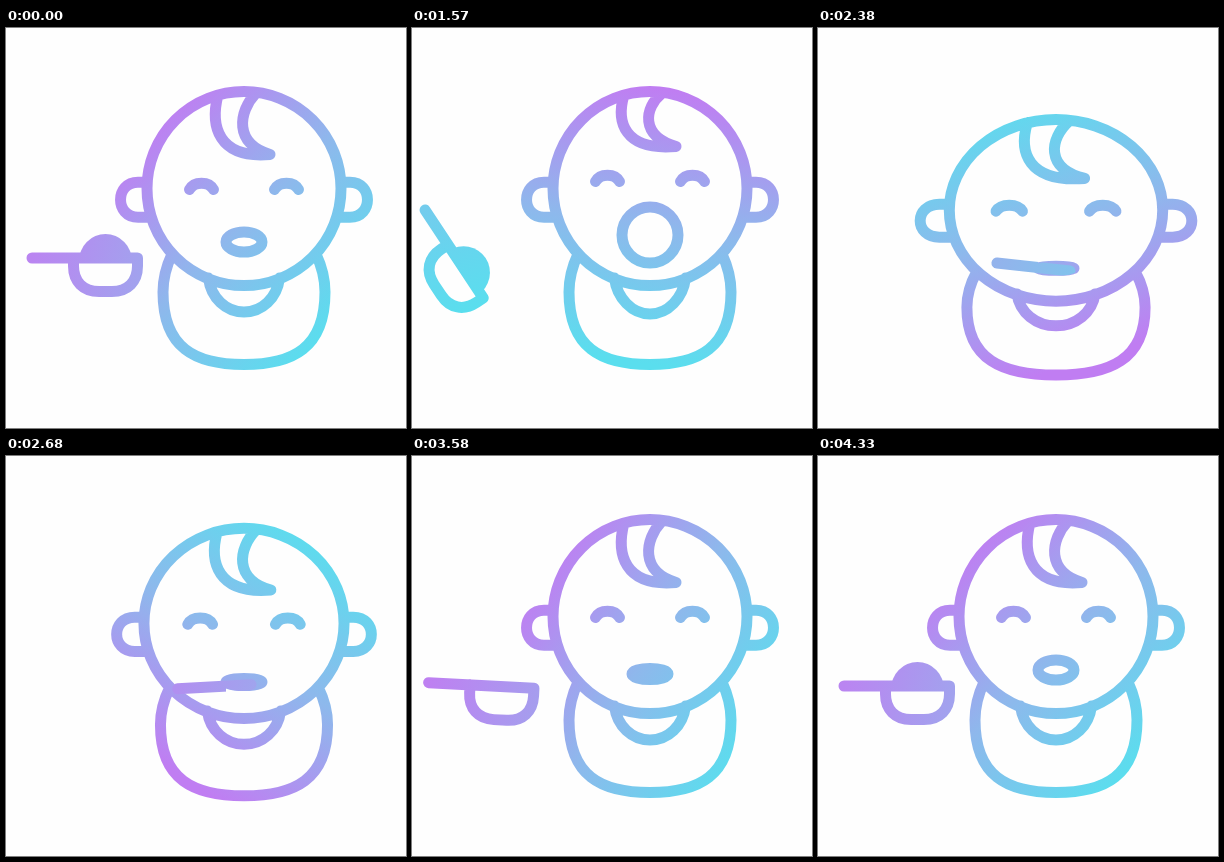
Write an HTML page with a canvas that moves like this. It is 400x400 px and loops after 4.36 s.

```html
<!DOCTYPE html>
<html lang="en">
<head>
<meta charset="utf-8">
<title>Feeding time</title>
<style>
  html, body { margin: 0; width: 100%; height: 100%; overflow: hidden; background: #fefefe; }
  canvas { display: block; width: 400px; height: 400px; }
</style>
</head>
<body>
<canvas id="stage" width="400" height="400"></canvas>
<script>
const ctx = document.getElementById('stage').getContext('2d');
const LOOP = 4360;
const LINE = 11;
const CENTER = 238;
const FLOOR = 336.5;
const PURPLE = [196, 120, 242];
const MIDDLE = [146, 181, 236];
const CYAN = [90, 222, 238];

// Moments of the story, in ms.
const START = 1010, OPEN = 1570, BITE = 2090, SHUT = 2380, LIFT = 3040, AWAY = 3400, REFILL = 3700, END = 4330;

const SPOON_STOPS = [
  { time: START, x: 99.5, y: 230, tilt: 0 },
  { time: OPEN, x: 53.6, y: 243.3, tilt: 56.5 },
  { time: SHUT, x: 252, y: 243, tilt: 6.2 },
  { time: LIFT, x: 236, y: 210, tilt: -15.5 },
  { time: AWAY, x: 90, y: 230.5, tilt: 3 },
  { time: REFILL, x: 90, y: 230.5, tilt: 3 },
  { time: END, x: 99.5, y: 230, tilt: 0 }
];

const clamp = u => Math.min(1, Math.max(0, u));
const smooth = u => u * u * (3 - 2 * u);
const mix = (a, b, u) => a + (b - a) * u;
const ease = (t, from, to) => smooth(clamp((t - from) / (to - from)));
const bump = (t, from, peak, to) => t < peak ? ease(t, from, peak) : 1 - ease(t, peak, to);

function tint(p) {
  const u = clamp(p) * 2;
  const [from, to] = u < 1 ? [PURPLE, MIDDLE] : [MIDDLE, CYAN];
  return `rgb(${from.map((v, i) => Math.round(mix(v, to[i], u < 1 ? u : u - 1))).join()})`;
}

function gradient(x0, y0, x1, y1, from, to) {
  const g = ctx.createLinearGradient(x0, y0, x1, y1);
  for (const u of [0, 0.5, 1]) g.addColorStop(u, tint(mix(from, to, u)));
  return g;
}

function spoonAt(t) {
  const next = SPOON_STOPS.findIndex(stop => stop.time > t);
  if (next < 1) return SPOON_STOPS[0];
  const a = SPOON_STOPS[next - 1], b = SPOON_STOPS[next];
  const u = ease(t, a.time, b.time);
  return { x: mix(a.x, b.x, u), y: mix(a.y, b.y, u), tilt: mix(a.tilt, b.tilt, u) };
}

function poseAt(t) {
  const squash = 0.28 * bump(t, START, 1300, OPEN) - 0.35 * bump(t, 1800, BITE, SHUT)
    + bump(t, BITE, SHUT, 2860);
  const lift = bump(t, 2700, LIFT, 3300);
  const open = ease(t, START, OPEN) - ease(t, BITE, SHUT);
  const shut = ease(t, BITE, SHUT) - ease(t, REFILL, 4200);
  const relax = shut * ease(t, SHUT, LIFT);

  const sx = 1 + 0.1 * squash;
  const sy = 1 - 0.064 * squash;
  const drop = 10.5 * squash - 4 * lift;
  const X = x => CENTER + (x - CENTER) * sx;
  const Y = y => FLOOR + drop + (y - FLOOR) * sy;
  const mouth = {
    rx: 18 + 10 * open,
    ry: 10 + 18 * open - 8 * shut + 3.5 * relax + lift,
    y: Y(214) - 7 * open + 8 * shut - 4 * relax - 2.5 * lift
  };

  const turned = smooth(1 - (1 - clamp((t - START) / (END - START))) ** 1.5);
  const turn = (45 + 360 * turned) * Math.PI / 180;
  return { sx, sy, X, Y, mouth, turn, look: -8 * open };
}

function drawBaby({ sx, sy, X, Y, mouth, turn, look }) {
  const move = (x, y) => ctx.moveTo(X(x), Y(y));
  const line = (x, y) => ctx.lineTo(X(x), Y(y));
  const curve = (a, b, c, d, e, f) => ctx.bezierCurveTo(X(a), Y(b), X(c), Y(d), X(e), Y(f));
  const oval = (x, y, rx, ry) => {
    ctx.moveTo(x + rx, y);
    ctx.ellipse(x, y, rx, ry, 0, 0, 2 * Math.PI);
  };

  const gx = 138 * Math.cos(turn), gy = 138 * Math.sin(turn);
  ctx.strokeStyle = gradient(CENTER - gx, 197 - gy, CENTER + gx, 197 + gy, 0.04, 1.04);
  ctx.beginPath();

  oval(X(CENTER), Y(160.6), 97 * sx, 97 * sy);

  for (const side of [-1, 1]) {
    const x = d => CENTER + side * d;
    // Ear
    move(x(97), 154.2);
    line(x(106), 154.2);
    curve(x(129.3), 154.2, x(129.3), 189.2, x(106), 189.2);
    line(x(94), 189.2);
    // Bib and its neckline
    move(x(72), 226);
    curve(x(79), 241, x(81), 252, x(81), 264);
    curve(x(81), 320, x(49), FLOOR, x(0), FLOOR);
    move(x(35.5), 250);
    curve(x(33), 270, x(18), 284 - look / 4, x(0), 284 - look / 4);
    // Eye
    const eye = x(42.5);
    move(eye - 12, 161.5 + look);
    curve(eye - 7.5, 153 + look, eye + 7.5, 153 + look, eye + 12, 161.5 + look);
  }

  // Curl of hair
  move(212, 67);
  curve(204, 98 + look / 2, 212, 131 + look, 264, 126.5 + look);
  curve(228, 116 + look, 232, 84 + look / 2, 250, 65);

  oval(CENTER, mouth.y, mouth.rx, mouth.ry);
  ctx.stroke();
}

function drawSpoon(t, { mouth, turn }) {
  const { x, y, tilt } = spoonAt(t);
  const angle = tilt * Math.PI / 180;
  const swallowed = ease(t, BITE, 2250);
  const depth = 1 - swallowed + ease(t, LIFT, 3200);
  const food = 1 - swallowed + ease(t, REFILL, 4120);
  const shade = 0.5 - 0.42 * Math.cos(turn + angle);

  ctx.save();
  // Past the lips the spoon shows only inside the mouth.
  ctx.beginPath();
  ctx.rect(0, 0, CENTER - mouth.rx, 400);
  ctx.ellipse(CENTER, mouth.y, mouth.rx + LINE / 2, mouth.ry + LINE / 2, 0, 0, 2 * Math.PI);
  ctx.clip();

  ctx.translate(x, y);
  ctx.rotate(angle);
  ctx.strokeStyle = ctx.fillStyle = gradient(-73.5, 0, 32, 25, shade - 0.1, shade + 0.14);

  const w = 32 * depth, h = 33.5 * depth;
  ctx.beginPath();
  ctx.moveTo(-73.5, 0);
  ctx.lineTo(w, 0);
  ctx.lineTo(w, h * 0.24);
  ctx.bezierCurveTo(w, h * 0.7, w * 0.7, h, w * 0.2, h);
  ctx.lineTo(-w * 0.2, h);
  ctx.bezierCurveTo(-w * 0.7, h, -w, h * 0.7, -w, h * 0.24);
  ctx.lineTo(-w, 0);
  ctx.stroke();

  ctx.beginPath();
  ctx.ellipse(0, 3, 26.5 * food, 27 * food, 0, Math.PI, 2 * Math.PI);
  ctx.fill();
  ctx.restore();
}

function draw(now) {
  const t = now % LOOP;
  const pose = poseAt(t);
  ctx.fillStyle = '#fefefe';
  ctx.fillRect(0, 0, 400, 400);
  ctx.lineWidth = LINE;
  ctx.lineCap = ctx.lineJoin = 'round';
  drawBaby(pose);
  drawSpoon(t, pose);
}

const start = performance.now();
function tick() {
  draw(performance.now() - start);
  requestAnimationFrame(tick);
}
tick();
</script>
</body>
</html>
```
